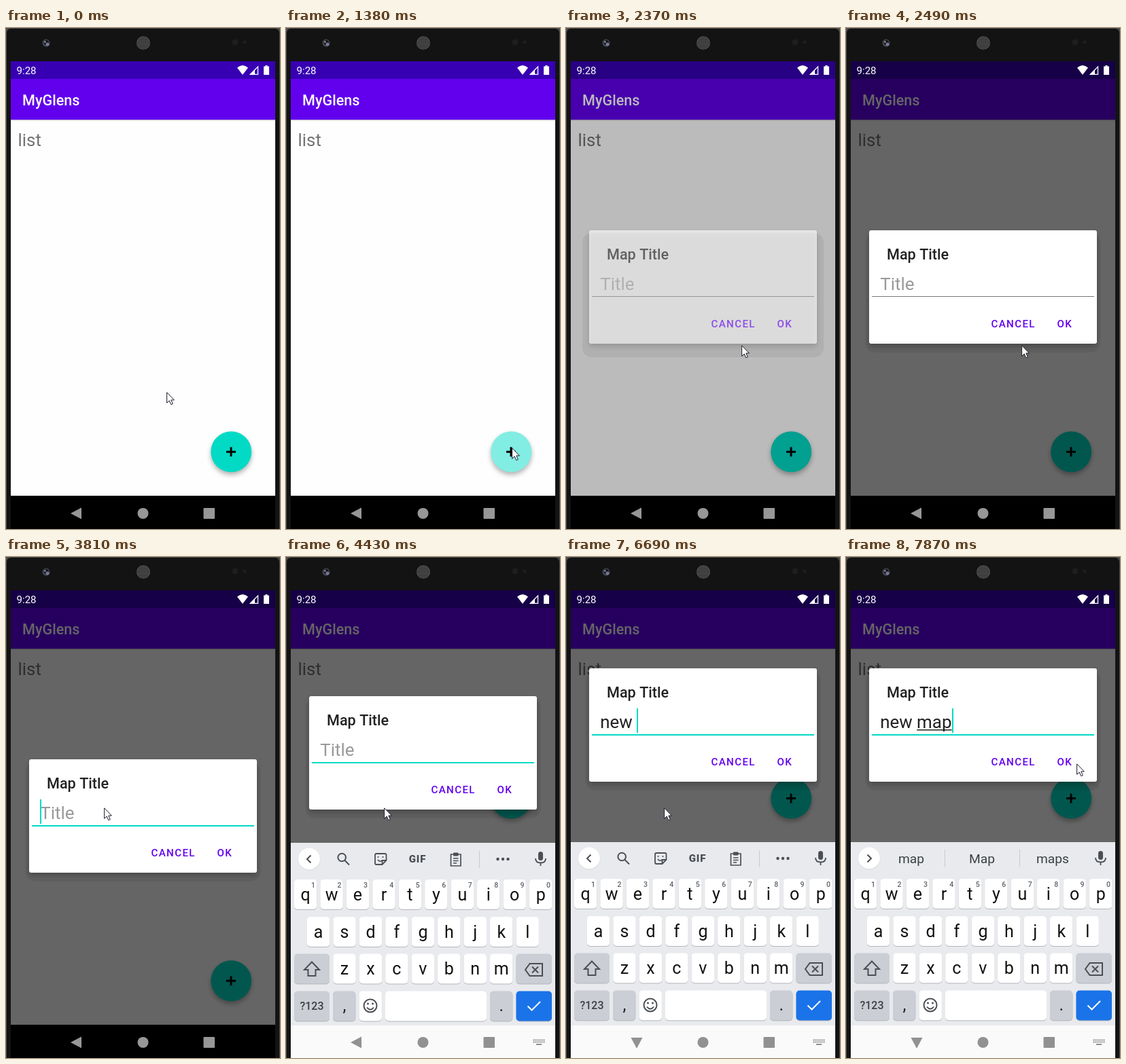
Animation of 403 by 738 pixels, one loop 7990 ms. Source, as an HTML page with a canvas:

```html
<!DOCTYPE html>
<html lang="en">
<head>
<meta charset="utf-8">
<title>Adding a map title</title>
<style>
  html, body { margin: 0; width: 100%; height: 100%; overflow: hidden; background: #131313; }
  canvas { display: block; }
</style>
</head>
<body>
<canvas id="stage" width="403" height="738"></canvas>
<script>
const ctx = document.getElementById('stage').getContext('2d');
const LOOP = 7990;
const TEAL = '#03dac5', PURPLE = '#6200ee', INK = '#212121', ICON = '#4b4f54';

// Each track lists [start, ...values]; a value holds until the next entry.
const pointer = [
  [0, 236, 536], [500, 240, 539], [620, 256, 552], [740, 273, 566],
  [890, 283, 577], [1010, 315, 606], [1130, 332, 618], [1670, 332, 614], [1790, 331, 611],
  [1940, 322, 592], [2060, 273, 492], [2220, 264, 472], [2370, 258, 467], [3050, 241, 467],
  [3200, 215, 430], [3320, 158, 344], [3440, 144, 369], [7870, 339, 304]];
const dialogTop = [[0, 298], [4310, 270], [4430, 205], [4580, 168], [4700, 164]];
const keyboardDrop = [[0, 300], [4060, 180], [4180, 90], [4310, 20], [4430, 1], [4580, 0]];
const backTurn = [[0, 0], [4580, 30], [4700, 70], [4840, 90]];
const caretOn = [[0, 0], [3690, 1], [4180, 0], [4700, 1], [6170, 0], [6690, 1]];
// text, underlined from, underlined to, suggestions
const typing = [
  [0, '', 0, 0], [4840, 'n', 0, 0], [4990, 'n', 0, 1], [5130, 'ne', 0, 2], [5250, 'new', 0, 2],
  [5390, 'new', 0, 3, 'new New news'], [5510, 'new ', 0, 0, 'new New news'], [5640, 'new ', 0, 0],
  [7080, 'new m', 4, 5], [7200, 'new ma', 4, 6], [7350, 'new map', 4, 6],
  [7470, 'new map', 4, 7, 'map Map maps']];
const at = (track, t) => track.findLast(step => step[0] <= t).slice(1);

function box(x, y, w, h, color, r = 0) {
  ctx.fillStyle = color;
  ctx.beginPath();
  ctx.roundRect(x, y, w, h, r);
  ctx.fill();
}
const disc = (x, y, r, color) => box(x - r, y - r, 2 * r, 2 * r, color, r);

function setFont(size, weight = 400) {
  ctx.font = `${weight} ${size}px Roboto, sans-serif`;
}
function label(text, x, y, size, color, weight, align = 'left', spacing = 0) {
  setFont(size, weight);
  ctx.fillStyle = color;
  ctx.textAlign = align;
  ctx.letterSpacing = spacing + 'px';
  ctx.fillText(text, x, y);
  ctx.letterSpacing = '0px';
}
function fill(d, color) {
  ctx.fillStyle = color;
  ctx.fill(new Path2D(d));
}
function stroke(d, color = ICON, width = 2) {
  ctx.strokeStyle = color;
  ctx.lineWidth = width;
  ctx.stroke(new Path2D(d));
}
function moved(x, y, draw) {
  ctx.save();
  ctx.translate(x, y);
  draw();
  ctx.restore();
}
function shadow(blur, dy, alpha) {
  ctx.shadowColor = `rgba(0,0,0,${alpha})`;
  ctx.shadowBlur = blur;
  ctx.shadowOffsetY = dy;
}

function drawDevice() {
  box(0, 0, 403, 738, '#4d4d4d');
  box(1, 1, 401, 760, '#131313', 6);
  disc(59, 22, 5.5, '#44464c');
  disc(59.5, 21.5, 3.5, '#14151c');
  disc(61, 24, 2.5, '#77799a');
  disc(57.5, 20.5, 1.2, '#9a9cac');
  disc(202, 22, 10, '#505050');
  for (let row = -4; row <= 4; row++)
    for (let col = -4; col <= 4; col++) {
      const x = col * 2.1 + (row & 1), y = row * 2.1;
      if (Math.hypot(x, y) < 9) disc(202 + x, 22 + y, 0.7, '#202020');
    }
  disc(337, 21, 4.5, '#1e1e1e');
  disc(351, 21, 2.5, '#1e1e1e');
}

function drawFab(y, pressed, raised) {
  ctx.save();
  if (raised) shadow(9, 5, 0.36); else shadow(7, 4, 0.3);
  disc(331.2, y, 30, pressed ? '#82ede3' : TEAL);
  ctx.restore();
  box(324, y - 1.5, 14, 3, '#000');
  box(329.5, y - 7, 3, 14, '#000');
}

function drawApp(t) {
  box(7, 49, 389, 640, '#fefefe');
  box(7, 135, 389, 1, '#c9c5d2');
  box(7, 136, 389, 1, '#eeecf1');
  box(7, 49, 389, 26, '#3700b3');
  box(7, 75, 389, 60, PURPLE);
  label('MyGlens', 24, 113.5, 21.6, '#fff', 500);
  label('list', 17.5, 174, 25.9, '#737373');
  drawFab(t < 4180 ? 624.3 : 355.5, t >= 1380 && t < 2220, t >= 1530 && t < 2220);
  if (t >= 2370) box(7, 49, 389, 640, `rgba(0,0,0,${t < 2490 ? 0.265 : 0.6})`);
}

function drawStatus() {
  label('9:28', 15.5, 68, 15.1, '#fff');
  fill('M348 69 L340 58.5 Q348 51.500 356 58.500 Z', '#fff');
  fill('M358 69 L366 61 V69 Z', '#fff');
  stroke('M359.500 68.300 L370.500 57 V68.300 Z', '#fff', 1.3);
  fill('M379 56.500 H381.500 V55 H384.500 V56.500 H387 V69 H379 Z', '#fff');
}

function drawDialog(t) {
  const [top] = at(dialogTop, t), [text, from, to] = at(typing, t);
  const fading = t < 2490, focused = t >= 3690;
  const side = fading ? 10 : 5, below = fading ? 20 : 13;
  ctx.save();
  ctx.translate(0, top);
  box(34 - side, 4, 335 + 2 * side, 163 + below, 'rgba(0,0,0,0.06)', 14);
  ctx.globalAlpha = fading ? 0.66 : 1;
  shadow(7, 4, 0.22);
  box(34, 0, 335, 167, '#fff', 3);
  shadow(0, 0, 0);
  label('Map Title', 60, 43, 21.6, INK, 500);
  label(text || 'Title', 50.2, 88, 25.9, text ? INK : '#999');
  const edge = n => 50.4 + ctx.measureText(text.slice(0, n)).width;
  if (to) box(edge(from), 90, edge(to) - edge(from), 1.4, INK);
  if (at(caretOn, t)[0]) box(Math.round(edge(text.length)), 59, 2, 36, TEAL);
  box(38, 97, 327, focused ? 2 : 1, focused ? TEAL : '#777');
  label('CANCEL', 213.5, 143, 15.1, PURPLE, 500, 'left', 1.35);
  label('OK', 310.5, 143, 15.1, PURPLE, 500, 'left', 1.35);
  ctx.restore();
}

function key(x, y, w, color = '#fff', h = 44) {
  box(x, y + 1, w, h, '#b4b6bb', 5);
  box(x, y, w, h, color, 5);
}
function letters(row, x, y) {
  [...row].forEach((char, i) => {
    const center = x + 38.45 * i;
    key(center - 16.7, y, 33.4);
    label(char, center, y + 30.5, 25, '#111', 400, 'center');
  });
}

function drawToolbar(words) {
  disc(34, 444, 16.5, '#d6d8db');
  disc(34, 443.5, 16, '#fff');
  stroke(words ? 'M31.500 438.500 L37 444 L31.500 449.500' : 'M36.500 438.500 L31 444 L36.500 449.500');
  box(371, 433, 7, 13, ICON, 3.5);
  stroke('M367 443 Q367 449.500 374.500 449.500 Q382 449.500 382 443 M374.500 449.500 V454', ICON, 1.8);
  if (words) {
    words.split(' ').forEach((word, i) =>
      label(word, 96 + 104 * i, 451, 19.2, '#3c4043', 400, 'center'));
    box(145, 431, 1, 26, '#c8cacd');
    box(255, 431, 1, 26, '#c8cacd');
    return;
  }
  stroke('M88 441.500 a5.800 5.800 0 1 1 -11.600 0 a5.800 5.800 0 1 1 11.600 0 M86.500 446 L93 452.500');
  stroke('M133 436 H145.500 Q147.500 436 147.500 438 V446 L141.500 452 H133 Q131 452 131 450 V438 Q131 436 133 436 Z M141.500 452 V446 H147.500', ICON, 1.8);
  stroke('M135 445 Q138 449 141 446 M135.500 440 V442 M142.500 440 V442', ICON, 1.6);
  label('GIF', 193.5, 449, 15, ICON, 900, 'center', 0.8);
  stroke('M242.500 437 H257 V454 H242.500 Z M246 443 H253.500 M246 446.500 H253.500 M246 450 H251', ICON, 1.7);
  box(246, 434.5, 7.5, 5, ICON, 1);
  box(284, 432, 1, 25, '#c8cacd');
  for (const x of [311.5, 319, 326.5]) disc(x, 444, 2.2, ICON);
}

function drawKeyboard(words) {
  const grey = '#cbced5';
  box(7, 420, 389, 320, '#e8eaed');
  drawToolbar(words);
  letters('qwertyuiop', 28.6, 474);
  [...'1234567890'].forEach((n, i) =>
    label(n, 40 + 38.45 * i, 486, 10.5, '#5f6368', 500, 'center'));
  letters('asdfghjkl', 47.6, 529);
  letters('zxcvbnm', 86, 583.5);
  key(12, 583.5, 52, grey);
  stroke('M38 595.500 L27 607 H32.500 V616 H43.500 V607 H49 Z');
  key(338.5, 583.5, 52.5, grey);
  stroke('M358.500 598 H377 V616 H358.500 L352 607 Z M362 602.500 L371 611.500 M371 602.500 L362 611.500');
  key(12, 638.5, 52, grey);
  label('?123', 38, 666, 16, '#3c4043', 500, 'center');
  key(69, 638.5, 33.4, grey);
  label(',', 86, 668, 25, '#222', 400, 'center');
  key(107.5, 638.5, 33.4);
  stroke('M133.500 660 a9.500 9.500 0 1 1 -19 0 a9.500 9.500 0 1 1 19 0 M119 662.500 Q124 669 129 662.500');
  disc(120.5, 657, 1.5, ICON);
  disc(127.5, 657, 1.5, ICON);
  key(146, 638.5, 149);
  key(300, 638.5, 33.4, grey);
  label('.', 316.7, 668, 25, '#222', 400, 'center');
  key(338.5, 638.5, 52.5, '#1a73e8');
  stroke('M355.500 660.500 L361.500 666.500 L374 654', '#fff');
}

function drawNavigation(t) {
  const light = t >= 4060, grey = light ? '#919191' : '#979797';
  box(7, light ? 690 : 689, 389, 49, light ? '#fafafa' : '#000');
  moved(104, 715, () => {
    ctx.rotate(-at(backTurn, t)[0] * Math.PI / 180);
    fill('M-9 0 L7 -8.500 V8.500 Z', grey);
  });
  disc(201.5, 715, 8, grey);
  box(290.5, 707, 16.5, 16, grey, 1);
  if (!light) return;
  for (let i = 0; i < 12; i++)
    box(363.5 + (i % 6) * 3, 710.5 + Math.floor(i / 6) * 3, 2, 2, grey);
  box(368, 717, 8, 2, grey);
}

function drawPointer(t) {
  moved(...at(pointer, t), () => {
    const arrow = 'M.600 .800 V16.300 L4.200 13 L6.800 18.700 L9.300 17.600 L6.800 12 H11.400 Z';
    fill(arrow, '#fff');
    stroke(arrow, '#1c1c2a', 1);
  });
}

function draw() {
  const t = performance.now() % LOOP;
  drawDevice();
  drawApp(t);
  drawStatus();
  if (t >= 2370) drawDialog(t);
  if (t >= 4060) moved(0, at(keyboardDrop, t)[0], () => drawKeyboard(at(typing, t)[3]));
  drawNavigation(t);
  drawPointer(t);
  requestAnimationFrame(draw);
}
draw();
</script>
</body>
</html>
```
